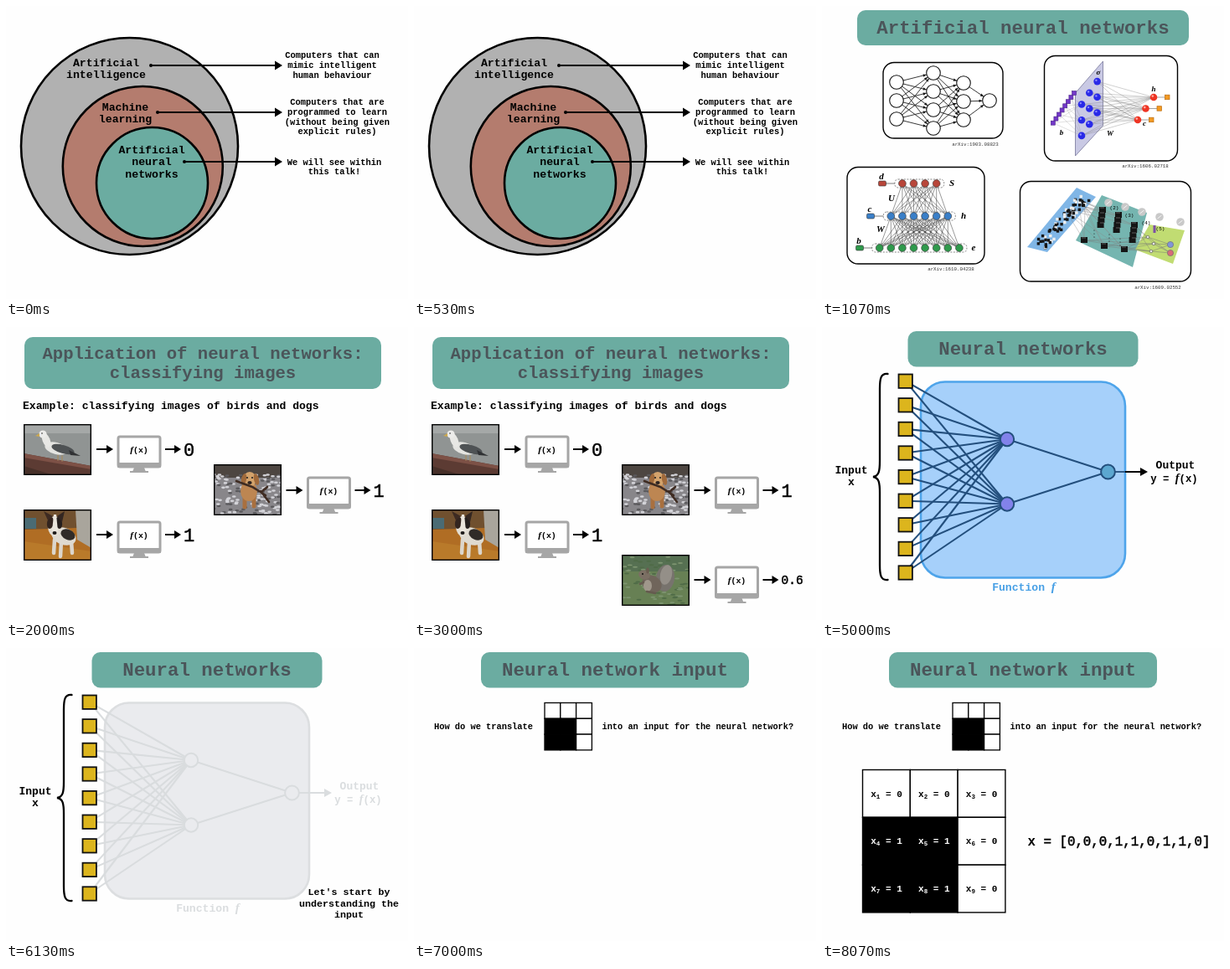
These frames come from a looping animation (480x350 px, 8.99 s). An HTML page:

```html
<!DOCTYPE html>
<html lang="en">
<head>
<meta charset="utf-8">
<title>Neural networks slides</title>
<style>
html, body { margin: 0; width: 100%; height: 100%; overflow: hidden; background: #fefefe; }
svg { display: block; width: 480px; height: 350px; }
text { font-family: "Liberation Mono", "Courier New", monospace; font-weight: 700; }
.math { font-family: "Liberation Serif", "Times New Roman", serif; font-style: italic; }
.plain { font-weight: 400; stroke: currentColor; stroke-width: .5; }
</style>
</head>
<body>
<svg id="stage" viewBox="0 0 480 350" xmlns="http://www.w3.org/2000/svg"></svg>
<script>
const LOOP = 8990;
const TEAL = '#6baca1', INK = '#4b555a';

const range = n => [...Array(n).keys()];
const each = (list, fn) => list.map(fn).join('');
let seed = 7;
const rand = () => (seed = seed * 16807 % 2147483647) / 2147483647;

// Basic shapes
const text = (x, y, size, s, attrs = '') =>
  `<text x="${x}" y="${y}" font-size="${size}" text-anchor="middle" ${attrs}>${s}</text>`;
const left = (x, y, size, s, attrs = '') =>
  `<text x="${x}" y="${y}" font-size="${size}" ${attrs}>${s}</text>`;
const lines = (x, ys, size, words) => each(words, (s, i) => text(x, ys[i], size, s));
const rect = (x, y, w, h, fill, attrs = '') =>
  `<rect x="${x}" y="${y}" width="${w}" height="${h}" fill="${fill}" ${attrs}/>`;
const disc = (x, y, r, fill, attrs = '') =>
  `<circle cx="${x}" cy="${y}" r="${r}" fill="${fill}" ${attrs}/>`;
const oval = (x, y, rx, ry, fill, turn = 0) =>
  `<ellipse rx="${rx}" ry="${ry}" fill="${fill}" transform="translate(${x} ${y}) rotate(${turn})"/>`;
const line = (x1, y1, x2, y2, color = '#000', w = 2) =>
  `<path d="M${x1} ${y1}L${x2} ${y2}" stroke="${color}" stroke-width="${w}" fill="none"/>`;
const poly = (points, fill, attrs = '') => `<polygon points="${points}" fill="${fill}" ${attrs}/>`;
const path = (d, color, w) =>
  `<path d="${d}" stroke="${color}" stroke-width="${w}" fill="none" stroke-linecap="round"/>`;
const arrow = (x1, x2, y, head = 8, half = 5, color = '#000') =>
  line(x1, y, x2 - head + 1, y, color) +
  poly(`${x2 - head},${y - half} ${x2},${y} ${x2 - head},${y + half}`, color);
const links = (from, to, color, w) =>
  each(from, a => each(to, b => line(a[0], a[1], b[0], b[1], color, w)));
const outline = 'stroke="#000" stroke-width="1.4"';
const func = '<tspan class="math" font-size="1.15em">f</tspan>';

const header = (x, y, w, h, size, words, ys) =>
  rect(x, y, w, h, TEAL, 'rx="10"') +
  each(words, (s, i) => text(x + w / 2, ys[i], size, s, `fill="${INK}"`));

// Nested fields
const pointer = (x, y) => disc(x, y, 2, '#000') + arrow(x, 330, y, 9, 5.5);
const fields = () =>
  disc(147.5, 167.5, 129.5, '#b1b1b1', 'stroke="#000" stroke-width="2.6"') +
  disc(163.3, 191.5, 95.5, '#b47c6e', 'stroke="#000" stroke-width="2.6"') +
  disc(174.5, 211.5, 66.5, TEAL, 'stroke="#000" stroke-width="2.6"') +
  lines(119.5, [72, 86], 13.2, ['Artificial', 'intelligence']) +
  lines(142.5, [125, 138.5], 13.2, ['Machine', 'learning']) +
  lines(174, [176, 190, 204.5], 13.2, ['Artificial', 'neural', 'networks']) +
  pointer(173, 71) + pointer(181, 127) + pointer(213, 186) +
  lines(389.5, [62, 74, 86], 10.45, ['Computers that can', 'mimic intelligent', 'human behaviour']) +
  lines(395.5, [118, 130, 142, 153], 10.45,
    ['Computers that are', 'programmed to learn', '(without being given', 'explicit rules)']) +
  lines(392, [189.5, 201], 10.45, ['We will see within', 'this talk!']);

// Gallery of four diagrams
const frame = (x, y, w, h) => rect(x, y, w, h, '#fff', `rx="13" ${outline}`);
const label = (x, y, s, size = 11) => text(x, y, size, s, 'class="math"');
const cite = (x, y, id) => text(x, y, 5.8, 'arXiv:' + id, 'fill="#333" style="font-weight:400"');
const column = (x, y, step, n) => range(n).map(i => [x, y + i * step]);

function feedForward() {
  const layers = [column(89, 91, 22, 3), column(133, 80, 22, 4), column(169, 92, 22, 3), [[200, 113]]];
  const wire = (a, b) => {
    const len = Math.hypot(b[0] - a[0], b[1] - a[1]);
    const ux = (b[0] - a[0]) / len, uy = (b[1] - a[1]) / len;
    const ex = b[0] - ux * 8.5, ey = b[1] - uy * 8.5;
    const tip = [ex, ey, ex - ux * 4 - uy * 1.7, ey - uy * 4 + ux * 1.7,
      ex - ux * 4 + uy * 1.7, ey - uy * 4 - ux * 1.7];
    return line(a[0], a[1], ex, ey, '#222', .9) + poly(tip.join(' '), '#111');
  };
  return frame(73, 67.5, 143, 90.5) +
    each(layers.slice(1), (to, i) => each(layers[i], a => each(to, b => wire(a, b)))) +
    each(layers.flat(), ([x, y]) => disc(x, y, 8.3, '#fff', 'stroke="#111" stroke-width="1.1"'));
}

function spheres() {
  const blue = range(9).map(i => [310 + i % 3 * 9.3, 117.5 - i % 3 * 13.7 + Math.floor(i / 3) * 18.7]);
  const red = range(3).map(i => [396 - i * 9.5, 109 + i * 13.5]);
  const purple = range(8).map(i => [301 - i * 3.6, 104 + i * 5.1]);
  return frame(265.5, 59.5, 159, 125.5) +
    poly('302.5,104 335.5,66 335.5,143 302.5,179', '#c9c9e4', 'stroke="#77779a" stroke-width=".8"') +
    links(purple.filter((p, i) => i % 2), blue.filter((p, i) => i % 3 == 0), '#999', .3) +
    links(blue, red, '#888', .4) +
    each(purple, ([x, y]) => rect(x - 2.5, y - 2.5, 5, 5, '#7338c8', 'stroke="#482088" stroke-width=".6"')) +
    each(blue, ([x, y]) => disc(x, y, 4.3, '#2929e8') + disc(x - 1.2, y - 1.4, 1.2, '#8c8cff')) +
    each(red, ([x, y]) => line(x, y, x + 16, y, '#666', .6) + disc(x, y, 4.3, '#ee3524') +
      disc(x - 1.2, y - 1.4, 1.3, '#ffaaa0') +
      rect(x + 13.5, y - 2.8, 5.5, 5.5, '#f39a22', 'stroke="#b96b10" stroke-width=".7"')) +
    label(330, 82, 'σ', 9) + label(286, 154, 'b', 9) + label(344, 155, 'W', 9) +
    label(396, 102, 'h', 9) + label(385, 143, 'c', 9);
}

function layered() {
  const rows = [
    { y: 212, n: 4, color: '#b8463a', bias: 72, names: ['d', 'S', 155] },
    { y: 251, n: 6, color: '#3a7fc8', bias: 58, names: ['c', 'h', 169] },
    { y: 289, n: 8, color: '#2f9a4c', bias: 45, names: ['b', 'e', 181] }
  ];
  const dots = rows.map(r => range(r.n).map(i => [116.3 + (i - (r.n - 1) / 2) * 13.6, r.y]));
  return frame(30, 192.5, 164, 115.5) +
    links(dots[0], dots[1], '#333', .5) + links(dots[1], dots[2], '#333', .5) +
    each(rows, (r, i) => {
      const x = dots[i][0][0] - 9;
      return rect(x, r.y - 5, 2 * (116.3 - x), 10, 'none',
          'rx="4" stroke="#555" stroke-width=".7" stroke-dasharray="2 1.5"') +
        line(r.bias, r.y, x, r.y, '#444', .7) +
        rect(r.bias - 4.5, r.y - 3, 9, 6, r.color, 'rx="1.5" stroke="#333" stroke-width=".6"') +
        each(dots[i], ([cx, cy]) => disc(cx, cy, 4.4, r.color, 'stroke="#333" stroke-width=".6"')) +
        label(r.bias - 1, r.y - 5, r.names[0]) + label(r.names[2], r.y + 3, r.names[1]);
    }) +
    label(83, 233, 'U') + label(70, 270, 'W');
}

function convolution() {
  const stacks = [[335, 244, 4], [354, 250, 4], [373, 262, 4], [313, 280, 1], [337, 287, 1], [361, 291, 1]];
  const bits = range(75).map(() => {
    const k = rand(), off = (rand() - .5) * 13;
    return [261 + 52 * k + off, 286 - 57 * k + off * .5];
  });
  const nodes = [[389, 276], [396, 284], [393, 293]];
  const outs = [[416, 285, '#8296d8'], [416, 295, '#d86c78']];
  return frame(236.5, 209.5, 204, 119.5) +
    poly('245,288 304,217 327,228 269,294', '#80b6e6') +
    poly('303,280 334,226 388,247 371,312', '#75b5b0') +
    poly('374,291 391,261 433,268 419,308', '#c1dc72') +
    links([[290, 243], [306, 231], [314, 240]], stacks.map(s => [s[0], s[1]]), '#888', .4) +
    links(stacks.slice(2).map(s => [s[0], s[1]]), nodes, '#777', .4) +
    links(nodes, outs, '#777', .5) +
    each(bits, ([x, y], i) => rect(x - 1.6, y - 1.6, 3.4, 3.4, i % 3 == 2 ? '#eee' : '#161616')) +
    each(stacks, ([x, y, n]) => each(range(n), i => rect(x - 4 - i * .8, y - 4 + i * 6, 8, 7, '#151515') +
      line(x - 3, y - 3 + i * 6, x + 2, y - 3 + i * 6, '#777', .7))) +
    each([325, 343, 356], (x, i) => each(range(3), j => disc(x, 268 + i * 5 + j * 4, .6, '#111'))) +
    rect(395.5, 262, 3, 9, '#7d4fa6') +
    each(nodes, ([x, y]) => disc(x, y, 1.8, '#e6e6e6', 'stroke="#555" stroke-width=".6"')) +
    each(outs, ([x, y, c]) => disc(x, y, 3.6, c, 'stroke="#667" stroke-width=".6"')) +
    each([[342, 235], [362, 240], [382, 246], [403, 252], [428, 258]], ([x, y]) =>
      disc(x, y, 4.8, '#c9c9c9') + line(x - 2.5, y + 2, x + 2.5, y - 2, '#f4f4f4', 1)) +
    each([[349, 243, 2], [367, 252, 3], [387, 261, 4], [404, 268, 5]], ([x, y, n]) =>
      text(x, y, 6, `(${n})`, 'style="font-weight:400"'));
}

const gallery = () =>
  header(42, 5, 396, 42, 22.4, ['Artificial neural networks'], [33]) +
  feedForward() + spheres() + layered() + convolution() +
  cite(183, 167, '1903.08823') + cite(386, 193, '1606.02718') +
  cite(154, 316, '1610.04238') + cite(401, 338, '1609.02552');

// Image -> f(x) -> result
const flow = (x, y, out, size = 22) =>
  arrow(x, x + 20, y) +
  rect(x + 26, y - 15, 50, 36, '#fff', 'rx="2" stroke="#a6a6a6" stroke-width="3"') +
  rect(x + 25, y + 16, 52, 6, '#a6a6a6', 'rx="1"') +
  poly(`${x + 45},${y + 22} ${x + 57},${y + 22} ${x + 59},${y + 27} ${x + 43},${y + 27}`, '#a6a6a6') +
  rect(x + 40, y + 26, 22, 2, '#a6a6a6') +
  text(x + 51, y + 3.5, 9.9, func + '(x)') +
  arrow(x + 82, x + 101, y) +
  left(x + 104, y + size * .35, size, out, 'class="plain"');

const photo = (x, y, back, inside) =>
  `<svg x="${x}" y="${y}" width="81" height="61">${rect(0, 0, 81, 61, back)}${inside}
   ${rect(.7, .7, 79.6, 59.6, 'none', 'stroke="#000" stroke-width="1.4"')}</svg>`;

const gull = () => photo(21, 116, '#909493',
  rect(0, 0, 81, 11, '#a5a8a7') + poly('0,35 81,50 81,61 0,61', '#5c3b33') +
  poly('0,35 81,50 81,54 0,40', '#7d5146') + poly('0,50 36,61 0,61', '#473029') +
  path('M41 37V43M46 38V44', '#a58c62', 1.3) +
  oval(39, 29, 14, 7, '#e4e4e1', 15) + oval(47, 30, 14, 5, '#4e5254', 16) +
  poly('54,31 68,38 56,37', '#303234') + oval(27, 19, 4.5, 9, '#e8e8e5', -22) +
  disc(23, 12, 4.6, '#ececea') + poly('19,11 14,14 19,15', '#cda94e') + disc(22, 11, .8, '#222'));

const puppy = () => photo(248, 164, '#88868a',
  rect(0, 0, 81, 16, '#4d4641') +
  each(range(150), i => oval(rand() * 81, 12 + rand() * 49, 2.4, 1.3, i % 3 ? '#d3d3d8' : '#5b5a5d')) +
  path('M37 36V51M48 36V50', '#a9703f', 5) + oval(42, 32, 10, 12, '#bd8652') +
  oval(43, 18, 8, 9, '#d3a36c') + oval(36, 18, 3, 7, '#a06a3b', 12) + oval(51, 18, 3, 7, '#a06a3b', -12) +
  disc(40, 16, 1.1, '#222') + disc(46, 16, 1.1, '#222') + oval(43, 22, 2.6, 2, '#2d2421') +
  path('M27 20L46 27L62 37M56 32L66 45M57 33L64 27', '#3f2c22', 2.6));

const terrier = () => photo(21, 218, '#b06d24',
  poly('0,0 64,0 64,22 0,24', '#70502f') + poly('62,0 81,0 81,46 64,36', '#a9a59c') +
  rect(0, 10, 15, 13, '#4a6b74') + poly('0,38 81,50 81,61 0,61', '#b97a2a') +
  path('M37 36L36 52M45 38L44 56M57 38L58 52', '#dcd6cc', 4.5) +
  oval(48, 32, 15, 10, '#dfdad0', 20) + oval(53, 30, 9, 6, '#302b28', 25) +
  oval(37, 20, 8, 12, '#e2ddd3') + oval(32, 16, 4, 7, '#33251f', 10) + oval(42, 16, 4, 7, '#251f1d', -10) +
  poly('29,13 24,2 35,8', '#3d2a22') + poly('40,8 49,2 46,15', '#332621') +
  poly('36,6 39,6 41,26 34,26', '#eae5dc') + oval(37, 28, 2.5, 2, '#1c1918'));

const squirrel = () => photo(248, 272, '#678054',
  rect(0, 0, 81, 20, '#567052') +
  each(range(90), i => oval(rand() * 81, rand() * 61, 3, 1, i % 2 ? '#7d9470' : '#4f6b47')) +
  oval(52, 28, 11, 16, '#77736d', 8) + oval(53, 24, 7, 12, '#948f88', 12) +
  oval(36, 35, 12, 10, '#70655b', 28) + oval(31, 37, 5, 7, '#a0978b') +
  oval(27, 24, 7, 5.5, '#7b6f63', 20) + oval(31, 19, 1.8, 3.5, '#6b5d50') + disc(25, 23, 1, '#111') +
  path('M26 33L22 35M30 44L40 46', '#655b4f', 2.6));

const appHeader = () => header(22, 12, 426, 62, 20.6,
  ['Application of neural networks:', 'classifying images'], [38, 61]);

const animals = () => appHeader() +
  left(20, 98, 13.1, 'Example: classifying images of birds and dogs') +
  gull() + flow(108, 146, '0') + puppy() + flow(334.5, 195, '1') + terrier() + flow(108, 248, '1');
const oddOne = () => squirrel() + flow(334.5, 302, '0.6', 14.5);

// Square grids: "1" marks a black cell
const grid = (x, y, cell, bits, w = 1.3) => each([...bits], (b, i) =>
  rect(x + i % 3 * cell, y + Math.floor(i / 3) * cell, cell, cell,
    b == 1 ? '#000' : '#fff', `stroke="#000" stroke-width="${w}"`));

const rectangles = () => appHeader() +
  left(20, 103, 11.7, 'Example: identifying whether an image contains one rectangle') +
  each([[33, 136, '000100100', 1], [274, 136, '101011100', 0], [33, 242, '001000000', 1], [274, 242, '110000011', 0]],
    ([x, y, bits, out]) => grid(x, y, 15.5, bits) + flow(x + 51.5, y + 23.5, out));

// Network slide
const inputs = column(99.7, 64.7, 28.6, 9);
const vivid = { box: '#a6d0fa', edge: '#4ea4ea', wire: '#234f7d', hidden: '#8282ea', out: '#5ca7d0', ink: '#000', name: '#469fe5' };
const faded = { box: '#eaebee', edge: '#dcdee0', wire: '#d9dcde', hidden: '#eaebee', out: '#eaebee', ink: '#dadddf', name: '#dadddf' };

function network(c) {
  const hidden = [[221, 134], [221, 211.5]], out = [341.5, 173];
  const ring = `stroke="${c.wire}" stroke-width="2"`;
  return header(102.5, 5, 275, 42.5, 22.4, ['Neural networks'], [33]) +
    rect(118, 65.5, 244, 234, c.box, `rx="29" stroke="${c.edge}" stroke-width="2.6"`) +
    links(inputs, hidden, c.wire, 2.1) + links(hidden, [out], c.wire, 2.1) +
    each(hidden, ([x, y]) => disc(x, y, 8.2, c.hidden, ring)) + disc(...out, 8.4, c.out, ring) +
    line(350, 173, 363, 173, c.wire, 1.8) + arrow(362, 389, 173, 9, 5, c.ink) +
    each(inputs, ([x, y]) => rect(x - 8.2, y - 8.2, 16.4, 16.4, '#dcb51d', 'stroke="#111" stroke-width="1.8"')) +
    path('M78.5 56C70 55 69 62 69 74V160C69 172 68 178 61 179C68 180 69 186 69 198V284C69 296 70 303 78.5 302', '#000', 2.3) +
    lines(35, [175, 189], 13, ['Input', 'x']) +
    text(422, 169, 13, 'Output', `fill="${c.ink}"`) +
    text(420.5, 185, 12.3, `y = ${func}(x)`, `fill="${c.ink}"`) +
    text(241, 315, 13.1, `Function ${func}`, `fill="${c.name}"`);
}
const hint = () => lines(409.5, [295, 308.5, 322], 11.7, ["Let's start by", 'understanding the', 'input']);

// Input slide
const BITS = '000110110';
const question = () =>
  header(80, 5, 320, 42.5, 22.5, ['Neural network input'], [33]) +
  left(24, 97, 10.35, 'How do we translate') + grid(156, 65.5, 18.8, BITS) +
  left(224.5, 97, 10.3, 'into an input for the neural network?');
const answer = () => grid(48.5, 145.5, 56.8, BITS, 1.4) +
  each([...BITS], (b, i) => text(77 + i % 3 * 56.8, 177.5 + Math.floor(i / 3) * 56.8, 11,
    `x<tspan font-size="7.5" dy="2">${i + 1}</tspan><tspan dy="-2"> = ${b}</tspan>`,
    `fill="${b == 1 ? '#fff' : '#000'}"`)) +
  left(245.5, 236, 15.8, `x <tspan class="plain">= [${[...BITS].join(',')}]</tspan>`);

// Each layer: start, end, drawing
const layers = [
  [0, 1000, fields()],
  [1000, 2000, gallery()],
  [2000, 4000, animals()],
  [3000, 4000, oddOne()],
  [4000, 5000, rectangles()],
  [5000, 6000, network(vivid)],
  [6000, 7000, network(faded) + hint()],
  [7000, LOOP, question()],
  [8000, LOOP, answer()]
];
const stage = document.getElementById('stage');
stage.innerHTML = each(layers, l => `<g>${l[2]}</g>`);
const groups = [...stage.children];

function draw() {
  const t = performance.now() % LOOP;
  groups.forEach((g, i) => {
    g.style.display = t >= layers[i][0] && t < layers[i][1] ? '' : 'none';
  });
  requestAnimationFrame(draw);
}
draw();
</script>
</body>
</html>
```
